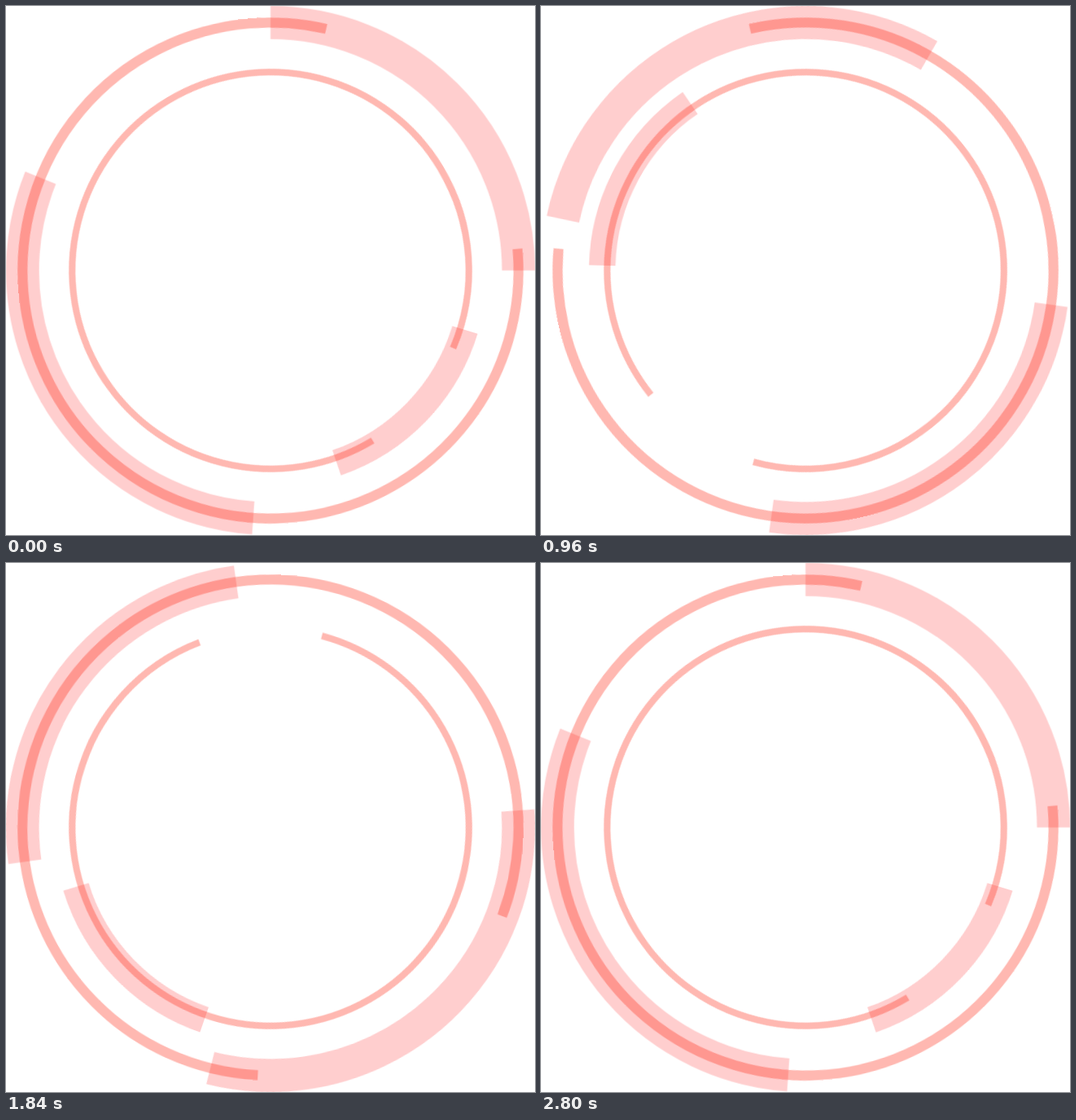
An HTML page for the animation above (2.88 s loop, 650 by 650 pixels).

```html
<!DOCTYPE html>
<html lang="en">
<head>
<meta charset="utf-8">
<title>Rotating rings</title>
<style>
  html, body { margin: 0; width: 100%; height: 100%; overflow: hidden; background: #fff; }
  svg { display: block; width: 100vw; height: 100vh; }
  circle { fill: none; }
  g { transform-origin: 160px 160px; }
  .band { stroke: #ffcece; }
  .line { stroke: rgb(255, 40, 20); stroke-opacity: .33; }
</style>
</head>
<body>
<svg viewBox="0 0 320 320"></svg>
<script>
const NS = 'http://www.w3.org/2000/svg';
const STEPS = 36, STEP_MS = 80;
const svg = document.querySelector('svg');

// Bezier easing with control points (x1, 0) and (x2, 1)
const bezier = (x1, x2) => x => {
  let lo = 0, hi = 1;
  for (let i = 0; i < 40; i++) {
    const t = (lo + hi) / 2, u = 1 - t;
    if (3 * u * u * t * x1 + 3 * u * t * t * x2 + t ** 3 < x) lo = t;
    else hi = t;
  }
  return lo * lo * (3 - 2 * lo);
};
const even = bezier(1 / 3, 2 / 3);
const late = bezier(1 / 3, 5 / 6);

function add(parent, name, attrs = {}) {
  const el = document.createElementNS(NS, name);
  for (const key in attrs) el.setAttribute(key, attrs[key]);
  return parent.appendChild(el);
}

// arcs: [start angle, sweep], clockwise from the right
function ring({ kind, radius, width, arcs, turn, ease }) {
  const group = add(svg, 'g');
  for (const [start, sweep] of arcs) {
    add(group, 'circle', {
      class: kind, cx: 160, cy: 160, r: radius, 'stroke-width': width,
      pathLength: 360, 'stroke-dasharray': `${sweep} ${360 - sweep}`,
      transform: `rotate(${start} 160 160)`
    });
  }
  const frames = Array.from({ length: STEPS + 1 }, (_, i) => ({
    offset: i / STEPS,
    easing: 'step-end',
    transform: `rotate(${turn * ease(Math.min(i / (STEPS - 1), 1))}deg)`
  }));
  group.animate(frames, { duration: STEPS * STEP_MS, iterations: Infinity });
}

[
  { kind: 'band', radius: 150, width: 20, arcs: [[270, 90], [94, 108]], turn: 360, ease: even },
  { kind: 'band', radius: 123, width: 16, arcs: [[17, 54]], turn: 720, ease: late },
  { kind: 'line', radius: 150, width: 6, arcs: [[355, 288]], turn: -360, ease: even },
  { kind: 'line', radius: 120, width: 4, arcs: [[59, 324]], turn: 360, ease: late }
].forEach(ring);
</script>
</body>
</html>
```
